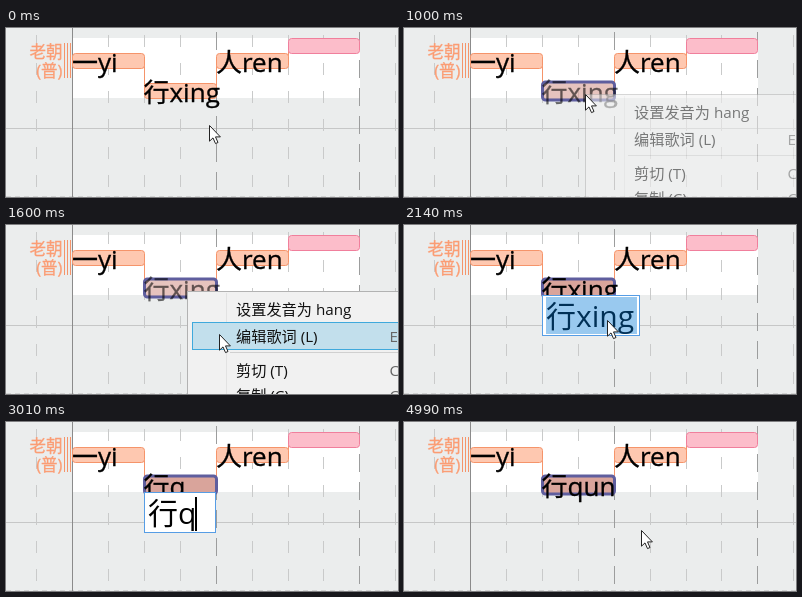
An HTML page for the animation above (5.08 s loop, 392 by 169 pixels).

```html
<!DOCTYPE html>
<html lang="zh">
<head>
<meta charset="utf-8">
<title>Lyric editing</title>
<style>
html, body { margin: 0; width: 100%; height: 100%; overflow: hidden; background: #ebeded; }
svg { display: block; width: 392px; height: 169px; }
text { font-family: "Open Sans", "Noto Sans CJK SC", "Noto Sans CJK", sans-serif; white-space: pre; }
.lyric { font-size: 26px; stroke: #000; stroke-width: .3; }
.label { font-size: 16.5px; fill: #fb9d74; stroke: #fb9d74; stroke-width: .3; text-anchor: end; }
.item { font-size: 15.2px; fill: #111; }
.key { font-size: 15.2px; fill: #666; }
.note { fill: #fec8b0; stroke: #f5946a; }
.link { stroke: #f5946a; fill: none; }
</style>
</head>
<body>
<svg viewBox="0 0 392 169">
  <rect width="392" height="169" fill="#ebeded"/>
  <rect x="67" y="10" width="287" height="60" fill="#fff"/>
  <path d="M0 100.5H392" stroke="#c6c7c7"/>
  <path d="M0 168.5H392" stroke="#d2d3d3" stroke-dasharray="5 4"/>
  <g id="grid"></g>
  <path d="M66.5 0V169" stroke="#8b8b8b"/>

  <text class="label" x="56.5" y="30">老朝</text>
  <text class="label" x="56.5" y="48.5">(普)</text>
  <path class="link" d="M58.5 15V50M61.5 15V50M64.5 15V50"/>

  <path class="link" d="M138.5 33V62M210.5 33V62M282.5 18V33"/>
  <rect class="note" x="66.5" y="25.5" width="72" height="15" rx="3"/>
  <rect class="note" x="210.5" y="25.5" width="72" height="15" rx="3"/>
  <rect x="282.5" y="10.5" width="71" height="15" rx="3" fill="#fcbdca" stroke="#f07f9c"/>
  <text class="lyric" x="66" y="43.5">一yi</text>
  <text class="lyric" x="210" y="43.5">人ren</text>

  <rect class="note" id="plain" x="138.5" y="55.5" width="72" height="15" rx="3"/>
  <rect id="picked" x="138.5" y="54" width="72" height="18" rx="3" fill="#d9a49b" stroke="#5f5e9e" stroke-width="3"/>
  <text class="lyric" id="lyric" x="137.5" y="73.5"></text>

  <g id="edit">
    <rect id="box" x="138.5" y="70.5" height="40" fill="#fff" stroke="#569de5"/>
    <text id="typed" x="142" y="102" font-size="30"></text>
    <rect id="selection" y="72" height="37" fill="#0078d7" opacity=".4"/>
    <rect id="caret" y="75" width="2" height="34"/>
  </g>

  <g id="menu">
    <rect x="181.5" y="66.5" width="230" height="120" fill="#f1f1f1" stroke="#b2b2b2"/>
    <path d="M220.5 68V169" stroke="#e2e2e2"/>
    <rect id="hot" x="186.5" y="97.5" width="220" height="27" fill="#c2dfec" stroke="#3fa9dc"/>
    <path d="M224 127.5H392" stroke="#d0d0d0"/>
    <text class="item" x="230" y="89.5">设置发音为 hang</text>
    <text class="item" x="230" y="117">编辑歌词 (L)</text>
    <text class="item" x="230" y="150.5">剪切 (T)</text>
    <text class="item" x="230" y="176">复制 (C)</text>
    <text class="key" x="383.5" y="117">Enter</text>
    <text class="key" x="383.5" y="150.5">Ctrl+X</text>
    <text class="key" x="383.5" y="176">Ctrl+C</text>
  </g>

  <path id="mouse" d="M.5 .5V16.2L4 12.9 6.5 18.6 9 17.5 6.5 11.9H11.4Z" fill="#fff" stroke="#222"/>
</svg>
<script>
const LOOP = 5080, RATE = 15;
const $ = id => document.getElementById(id);
const set = (id, attrs) => { for (const k in attrs) $(id).setAttribute(k, attrs[k]); };
const show = (id, on) => set(id, { visibility: on ? 'visible' : 'hidden' });

// Beat lines; the bar lines are darker with longer dashes
const beats = [30, 102, 138, 174, 210, 246, 282, 317, 353, 389];
$('grid').innerHTML = beats.map(x => {
  const bar = x === 210 || x === 353;
  return `<path d="M${x}.5 ${bar ? 4 : 7}V169" stroke="${bar ? '#9c9d9d' : '#c9caca'}"
    stroke-dasharray="${bar ? '18 10' : '12 16'}"/>`;
}).join('');

// Tracks of [time, ...values], linear between keys
const path = [
  [67, 203, 97], [467, 172, 66], [600, 174, 74], [667, 181, 66], [1000, 181, 66],
  [1267, 204, 99], [1400, 213, 109], [1934, 213, 109], [2134, 203, 95],
  [4667, 203, 95], [5000, 237, 108]
];
const fade = [[867, 0], [1120, 1], [1601, 1], [1800, 0]];

function at(track, t) {
  const i = track.findIndex(k => k[0] >= t);
  if (i < 0) return track[track.length - 1].slice(1);
  if (i === 0) return track[0].slice(1);
  const a = track[i - 1], b = track[i], p = (t - a[0]) / (b[0] - a[0]);
  return a.slice(1).map((v, j) => v + (b[j + 1] - v) * p);
}

function draw(ms) {
  const step = Math.floor((ms + 11) * RATE / 1000);
  const t = step * 1000 / RATE + .5;
  const word = t < 3000 ? '行xing' : t < 3260 ? '行q' : t < 3520 ? '行qu' : '行qun';
  const editing = t > 1720 && t < 4190;
  const hover = t > 390 && t < 1720;

  $('lyric').textContent = $('typed').textContent = word;
  set('lyric', { opacity: hover ? .58 : 1 });
  set('plain', { opacity: hover ? .7 : 1 });
  set('picked', { 'fill-opacity': hover ? .65 : 1 });
  show('plain', t < 790);
  show('picked', t > 790);

  set('edit', { display: editing ? 'inline' : 'none' });
  const right = t < 3000 ? 236 : t < 3320 ? 210 : t < 3520 ? 213 : 232;
  set('box', { width: right - 139 });
  const from = t < 2390 ? 142 : 172;
  set('selection', { x: from, width: t < 3000 ? 233 - from : 0 });
  set('caret', { x: 189 + 18.4 * (word.length - 2), width: t > 3000 && t < 4120 ? 2 : 0 });

  set('menu', { opacity: at(fade, t)[0] });
  show('hot', t > 1260);

  const [x, y] = at(path, t);
  set('mouse', { transform: `translate(${Math.round(x)} ${Math.round(y)})` });
  show('mouse', t < 2460 || t > 4190);
}

const start = performance.now();
function tick() {
  draw((performance.now() - start) % LOOP);
  requestAnimationFrame(tick);
}
tick();
</script>
</body>
</html>
```
